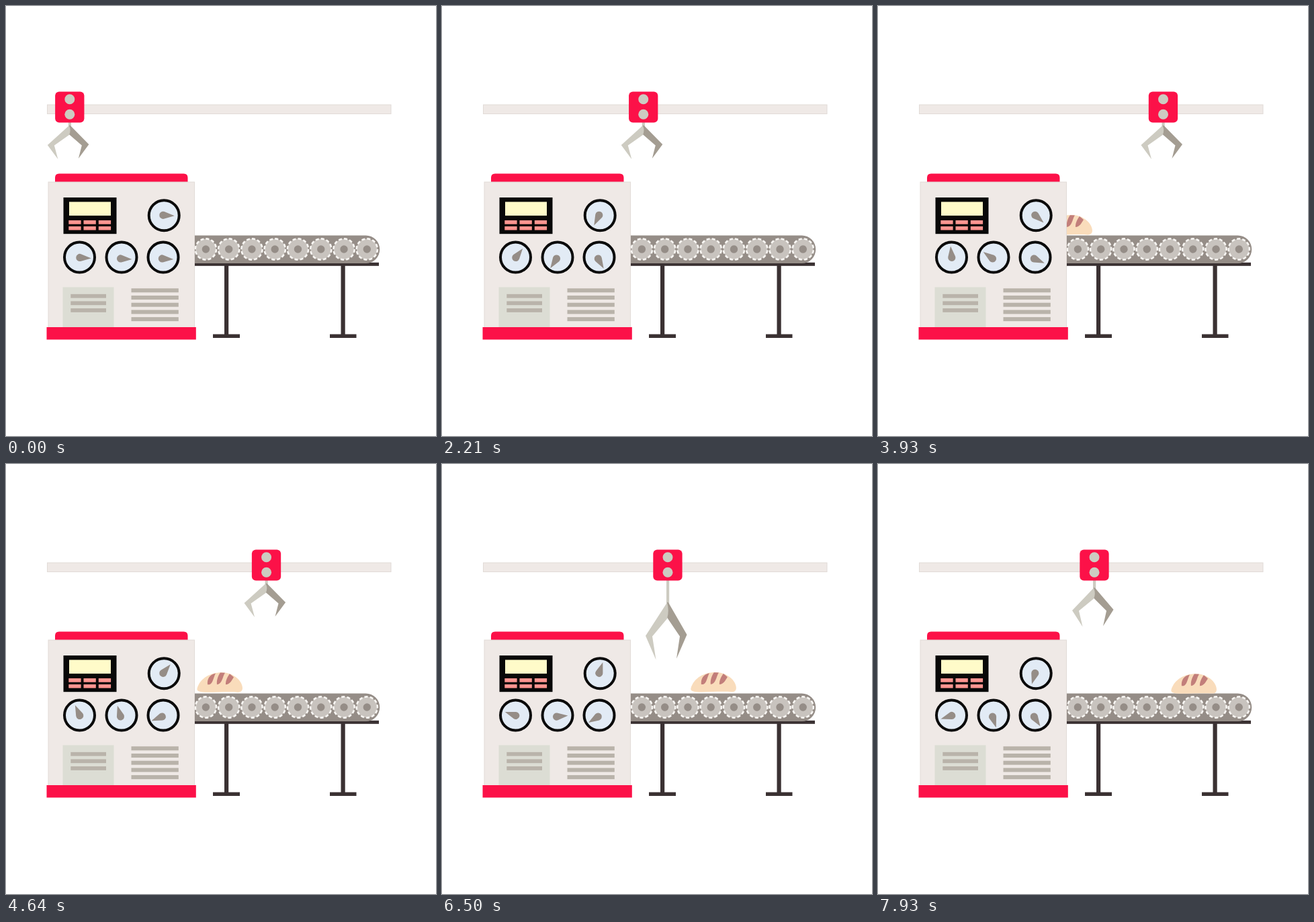
An HTML page that plays this animation: 640x640 px, repeating every 8 s.

```html
<!DOCTYPE html>
<html lang="en">
<head>
<meta charset="utf-8">
<title>Bread machine</title>
<style>
  html, body { margin: 0; width: 100%; height: 100%; overflow: hidden; background: #fff; }
  svg { display: block; width: 100%; height: 100%; }
</style>
</head>
<body>
<svg viewBox="0 0 640 640">
  <rect x="61.5" y="147" width="511.5" height="13.5" fill="#efe9e6" stroke="#e1dbd7"/>

  <g id="carriage">
    <g id="claw">
      <rect x="-2" y="138" width="4.2" height="43" fill="#cdcbc1"/>
      <path d="M-1 177.5L1 178 28.5 206 13 227 18 207.5-1 191Z" fill="#a49d92"/>
      <path d="M-1 178L-33 207-17.5 228-23 207.5-1 192Q2.500 185-1 178Z" fill="#cdcbc1"/>
    </g>
    <rect x="-21.700" y="127.500" width="43.300" height="46" rx="6" fill="#fc1148"/>
    <circle cy="138.800" r="7.500" fill="#cdcbc1"/>
    <circle cy="161.300" r="7.500" fill="#cdcbc1"/>
  </g>

  <g fill="#3a3132">
    <rect x="278" y="381.800" width="277" height="5"/>
    <rect x="325" y="386" width="6.200" height="103"/>
    <rect x="308" y="488.500" width="40" height="5.500"/>
    <rect x="498.500" y="386" width="6.200" height="103"/>
    <rect x="482" y="488.500" width="39.500" height="5.500"/>
  </g>
  <path d="M278 341.500H535.500A20.700 20.700 0 0 1 535.500 383H278Z" fill="#958d87"/>
  <g id="wheels"></g>

  <g id="bread">
    <path d="M-67.500 334C-63 318-47 310-31 310C-13 310 0 323 0 333C0 338-3 339.500-7 339.300C-20 338-46 340-59 339.200C-66 338.500-68 337-67.500 334Z" fill="#f9dcbb"/>
    <g fill="#c27e7a">
      <path d="M-52 328C-53 320-49 313-40 311.200C-43 317-44 326-49 328Z"/>
      <path d="M-38 328C-39 320-35 313-33 310.200L-26 310.500C-30 317-30 327-38 328Z"/>
      <path d="M-25 328C-25 321-22 316-19 312L-13 317C-16 322-19 328-25 328Z"/>
    </g>
  </g>

  <path d="M73 262V255.500Q73 249.500 79 249.500H264.500Q270.500 249.500 270.500 255.500V262Z" fill="#fc1148"/>
  <rect x="63" y="262" width="217.500" height="217" fill="#efe9e6" stroke="#e1dbd7"/>
  <rect x="60.500" y="478" width="222.300" height="18.500" fill="#fc1148"/>
  <rect x="85.500" y="285" width="79" height="54.200" fill="#080808"/>
  <rect x="94" y="291.500" width="62" height="20.500" fill="#fffbc9"/>
  <rect x="84.500" y="418.500" width="76" height="59.500" fill="#dcddd4"/>
  <g id="details"></g>
  <g id="dials"></g>
</svg>
<script>
const LOOP = 8000, FPS = 14;
const $ = id => document.getElementById(id);

function add(parent, tag, attrs) {
  const el = document.createElementNS(parent.namespaceURI, tag);
  for (const name in attrs) el.setAttribute(name, attrs[name]);
  parent.appendChild(el);
  return el;
}

function bar(x, y, width, height, fill) {
  add($('details'), 'rect', { x, y, width, height, fill });
}
for (const x of [93.3, 115.5, 137.8]) {
  bar(x, 319, 18.3, 5.7, '#ff9590');
  bar(x, 328, 18.3, 5.5, '#ff9590');
}
for (let i = 0; i < 3; i++) bar(96.3, 428.8 + i * 10.6, 52.7, 5.8, '#b9b3aa');
for (let i = 0; i < 5; i++) bar(186.5, 420.3 + i * 10.7, 70.3, 6, '#b9b3aa');

const wheels = Array.from({ length: 8 }, (_, i) => {
  const g = add($('wheels'), 'g', {});
  add(g, 'circle', { r: 15.5, fill: '#c8c3be' });
  add(g, 'circle', {
    r: 15.6, fill: 'none', stroke: '#f8f6f3', 'stroke-width': 2.6,
    pathLength: 12, 'stroke-dasharray': '.62 .38'
  });
  add(g, 'circle', { r: 5.7, fill: '#958d87' });
  return { g, x: 297.4 + i * 34.27 };
});

// Face centre, needle pivot, degrees per second
const dials = [
  [109.5, 374, 109.8, 374.5, -25.2],
  [172, 374, 170.5, 376, 54.1],
  [234, 374, 232.3, 376, 188.5],
  [235.2, 311.7, 233.8, 311.3, 376.3]
].map(([cx, cy, x, y, speed]) => {
  add($('dials'), 'circle', { cx, cy, r: 22.5, fill: '#e2ebf5', stroke: '#0a0a0a', 'stroke-width': 4 });
  const needle = add($('dials'), 'path', { d: 'M17 0L1.500-5.400A5.600 5.600 0 1 0 1.500 5.400Z', fill: '#958d87' });
  return { needle, x, y, speed };
});

// Each table holds [time, value]; values ease along a half cosine.
const carriageX = [[-130, 94], [3920, 424.5], [3990, 424.5], [5450, 336], [6750, 336], [14363, 95]];
const clawStretch = [[5450, 1], [6800, 1.8], [8400, 1]];
const breadDrop = [[3200, 1.5], [5300, 0], [6500, 0], [7900, 2.3]];

function ease(steps, t) {
  if (t <= steps[0][0]) return steps[0][1];
  for (let i = 1; i < steps.length; i++) {
    const [t0, a] = steps[i - 1], [t1, b] = steps[i];
    if (t < t1) return a + (b - a) * (1 - Math.cos(Math.PI * (t - t0) / (t1 - t0))) / 2;
  }
  return steps[steps.length - 1][1];
}

const place = (el, x, y, rest = '') => el.setAttribute('transform', `translate(${x} ${y}) ${rest}`);

function draw(now) {
  const t = Math.floor((now % LOOP + 5) * FPS / 1000) * 1000 / FPS % LOOP;
  place($('carriage'), ease(carriageX, t), 0);
  place($('claw'), 0, 138, `scale(1 ${ease(clawStretch, t)}) translate(0 -138)`);
  place($('bread'), 319 + (t - 3930) * 0.04625, ease(breadDrop, t));
  for (const { g, x } of wheels) place(g, x, 362, `rotate(${t * 0.165})`);
  for (const { needle, x, y, speed } of dials) place(needle, x, y, `rotate(${3 + t * speed / 1000})`);
}

const start = performance.now();
function tick() {
  draw(performance.now() - start);
  requestAnimationFrame(tick);
}
tick();
</script>
</body>
</html>
```
